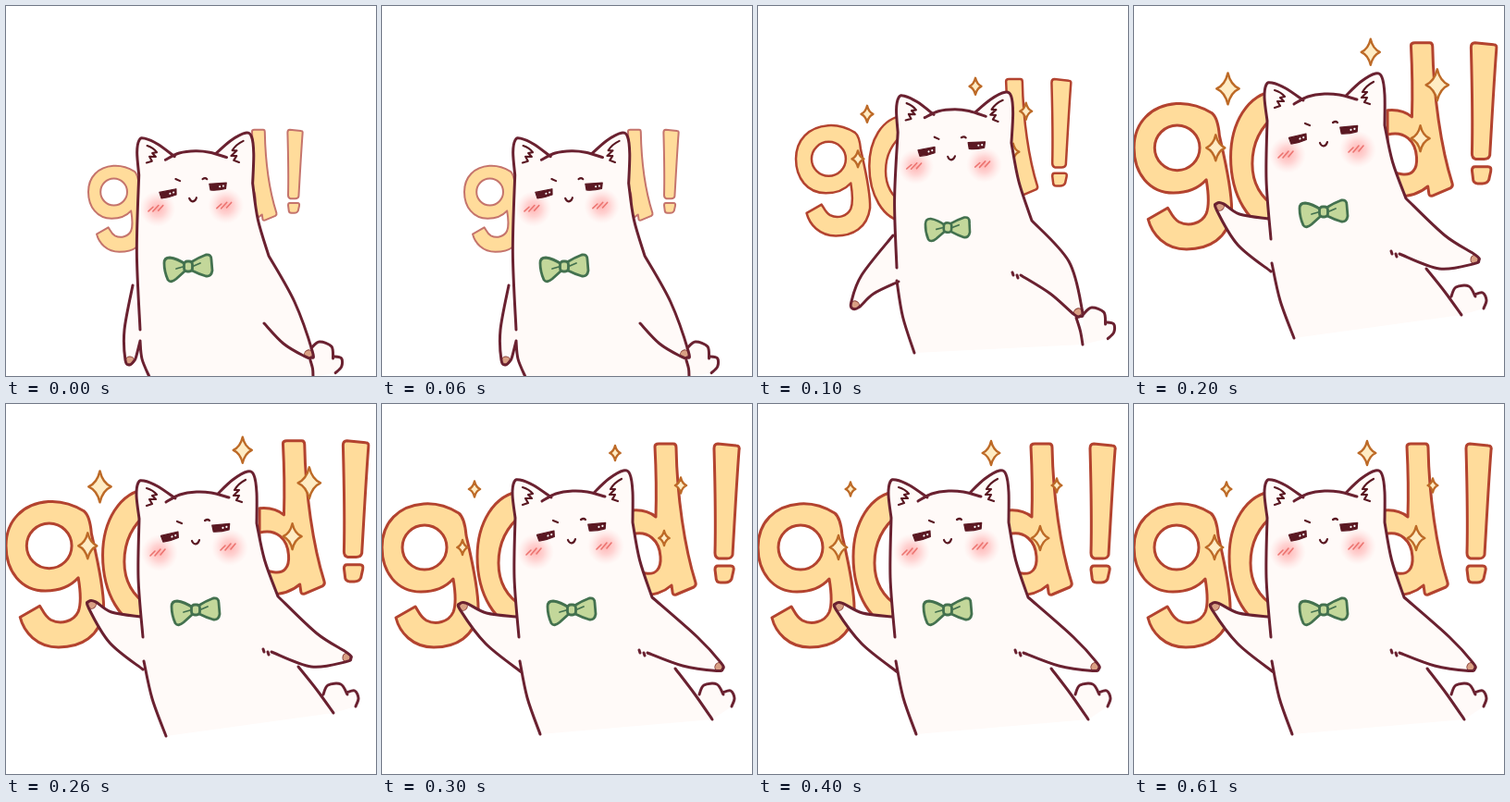
These frames come from a looping animation (400x400 px, 750 ms). An HTML page:

```html
<!DOCTYPE html>
<html lang="en">
<head>
<meta charset="utf-8">
<title>Proud white cat</title>
<style>
html, body { margin: 0; width: 100%; height: 100%; overflow: hidden; background: #fff; }
svg { display: block; width: 100vw; height: 100vh; }
</style>
</head>
<body>
<svg viewBox="0 0 400 400" stroke-linecap="round" stroke-linejoin="round">
  <defs>
    <radialGradient id="blush">
      <stop offset="0" stop-color="#ff9c9c" stop-opacity=".75"/>
      <stop offset=".45" stop-color="#ffb4b4" stop-opacity=".55"/>
      <stop offset="1" stop-color="#ffd4d4" stop-opacity="0"/>
    </radialGradient>
    <g id="word">
      <path fill-rule="evenodd" d="M83 118C70 110 58 107 45 108C18 110 0 128 0 155C0 182 16 203 42 203C58 203 69 198 77 189C79 201 81 215 77 225C72 236 58 239 48 234C41 230 39 223 36 219L15 231C19 247 33 263 56 263C80 263 100 252 104 224C105 200 95 160 91 142C90 130 88 122 83 118ZM22 155a24 24 0 1 0 48 0a24 24 0 1 0-48 0Z"/>
      <path d="M152 94C120 97 103 130 103 165C103 205 122 240 152 243V219C136 209 126 195 126 172C126 150 134 133 152 119Z"/>
      <path fill-rule="evenodd" d="M295 46Q295 43 299 43H315Q318 43 318 47C319 100 327 155 339 193Q340 196 337 198L318 206Q314 207 314 203L313 196C303 205 292 207 280 207H270V115C280 114 290 117 296 122C297 90 296 65 295 46ZM270 141C288 136 300 148 301 165C302 178 296 185 285 183L270 180Z"/>
      <path d="M363 43L383 45Q387 45 386 50C383 90 381 130 379 163Q378 167 373 167H364Q360 166 360 161C361 120 360 85 359 48Q359 43 363 43Z"/>
      <path d="M363 175H377Q381 175 380 180L378 189Q376 193 371 193H366Q361 193 361 187L360 179Q360 175 363 175Z"/>
    </g>
    <g id="eye">
      <path fill="#5a1822" stroke-width="1.2" d="M-9-3.5L10-4L9 2.5Q0 4.5-8 3.5Z"/>
      <path stroke="#fff" stroke-width="2.2" d="M2.5 0h0M6.5-.6h0"/>
    </g>
    <g id="cheek">
      <circle r="20" fill="url(#blush)" stroke="none"/>
      <path id="marks" d="M-10 3l5-5M-5 3l6-7M1 2l5-6" stroke="#ec7470" stroke-width="1.6"/>
    </g>
    <g id="face" fill="none" stroke="#5a1822" stroke-width="2.2">
      <use href="#cheek" x="-39" y="12"/><use href="#cheek" x="37" y="6"/>
      <path d="M-4-1Q-3 2 0 2.5Q3 2 4-2"/>
      <path d="M-20-22L-15-20M10-23Q13-25 15-23"/>
      <use href="#eye" transform="translate(-28 -5) rotate(-12)"/>
      <use href="#eye" transform="translate(27 -15) rotate(-4)"/>
      <path d="M-53-58Q-46-56-42-51L-47-50L-43-46L-50-46L-47-41L-53-39"/>
      <path d="M54-67Q46-63 42-56L47-56L41-50L47-50L44-45L50-43"/>
    </g>
    <g id="bow" fill="#c3d79a" stroke="#43714f" stroke-width="2.8">
      <path d="M-3-3Q-12-9-20-10Q-26-10-26-4Q-26 5-22 14Q-19 18-13 13L-3 4Z"/>
      <path d="M3-5Q11-10 19-13Q25-14 25-8L26 4Q25 11 19 10Q12 8 4 4Z"/>
      <path d="M-13 2L-6 0M6-1L13-4" fill="none" stroke-width="1.8"/>
      <rect x="-4.5" y="-6" width="9" height="11" rx="3.5"/>
    </g>
    <path id="star" d="M0-1Q.24-.24 1 0Q.24.24 0 1Q-.24.24-1 0Q-.24-.24 0-1Z" vector-effect="non-scaling-stroke"/>
  </defs>
  <g id="scene"></g>
</svg>
<script>
const scene = document.getElementById('scene');
const LINE = '#6a2130', SKIN = '#fffaf8';

// Shared shapes: the head around the mouth, the tail around its root
const points = text => text.split(' ').map(s => s.split(',').map(Number));
const HEAD = [
  '-61,-25 -64,-50 -62,-64 -56,-66 -41,-60 -22,-47',
  '-32,-43 -17,-51 1,-54 17,-53 36,-48',
  '24,-52 40,-67 56,-76 63,-72 66,-53 66,-20'
].map(points);
const TAIL = ['0,0 5,-10 19,-11 26,0', '25,-2 34,-4 38,4 35,13'].map(points);

// Stars sit in the space of the word; the late ones swell after the others
const STARS = [[100, 92], [323, 88], [252, 53, 1], [87, 155, 1], [305, 145, 1]];

// Placements are x, y, turn, scale. Arms run clockwise and the third point is the paw.
// Hips: right top and bottom, left bottom and top.
const rise = {
  head: [202, 209, 2, 0.97], bow: [197, 282], tail: [330, 370, 25],
  right: '284,270 312,320 327,376 300,365 279,343',
  left: '145,362 141,378 134,383 128,350 137,302',
  waist: [145, 350], hips: '329,383 332,401 155,401 145,362',
  word: [89, 108, 0, 0.6], ink: '#c5746c', pen: 2, glow: [0, 0]
};
const spread = {
  head: [209, 164, 3, 0.97], bow: [205, 240, 2, 0.93], tail: [352, 333, 25],
  right: '296,232 336,276 346,331 316,311 284,291',
  left: '152,298 125,311 105,323 112,291 146,248',
  waist: [150, 283], hips: '344,337 351,366 169,375 150,297',
  word: [41, 46, 0, 0.77], ink: '#b3432f', pen: 2.5, glow: [9, 9], dash: true
};
const settle = {
  head: [205, 148], bow: [205, 223], tail: [343, 314],
  right: '292,209 341,252 364,284 325,283 287,269',
  left: '151,290 112,259 88,219 113,226 146,230',
  waist: [148, 252], hips: '317,286 357,341 171,357 149,278',
  word: [0, 0], ink: '#b3432f', pen: 3, glow: [8.5, 8], dash: true
};
const fling = {
  ...settle, head: [205, 149],
  right: '294,208 336,248 368,274 330,284 287,268',
  left: '148,287 112,258 93,217 114,225 146,230',
  hips: '316,284 354,334 173,359 149,278',
  word: [0, -4, 0, 1.015], glow: [17, 14]
};
const twinkle = { ...settle, glow: [7.5, 13] };
const poses = [rise, spread, fling, settle, twinkle];

function move(list, [x, y, turn = 0, size = 1]) {
  const a = turn * Math.PI / 180, c = Math.cos(a) * size, s = Math.sin(a) * size;
  return list.map(([u, v]) => [x + u * c - v * s, y + u * s + v * c]);
}

// Line from a to b whose middle is pushed sideways
const bend = (a, b, push) => [a, [(a[0] + b[0]) / 2 + push, (a[1] + b[1]) / 2], b];

// Arm with a rounded paw that points away from the elbow
function arm(text) {
  const [from, over, [x, y], under, to] = points(text);
  const a = Math.atan2(y - (over[1] + under[1]) / 2, x - (over[0] + under[0]) / 2);
  const tip = [-1.57, 0, 1.57].map(k => [x + 5 * Math.cos(a + k), y + 5 * Math.sin(a + k)]);
  const paw = `<ellipse rx="4" ry="4.5" fill="#d9a084" stroke="#8a4038" transform="translate(${x} ${y}) rotate(${a * 180 / Math.PI})"/>`;
  return { line: [from, over, ...tip, under, to], paw };
}

// Smooth curve through points
function curve(p, start = 'M') {
  const at = i => p[Math.max(0, Math.min(p.length - 1, i))];
  let d = start + p[0];
  for (let i = 0; i < p.length - 1; i++) {
    const [a, b, c, e] = [at(i - 1), at(i), at(i + 1), at(i + 2)];
    const out = [0, 1].map(k => b[k] + (c[k] - a[k]) / 6);
    const into = [0, 1].map(k => c[k] - (e[k] - b[k]) / 6);
    d += `C${out} ${into} ${c}`;
  }
  return d;
}
const strokes = lines => lines.map(p => curve(p)).join('');
const area = lines => lines.map((p, i) => curve(p, i ? 'L' : 'M')).join('') + 'Z';
const place = (id, [x, y, turn = 0, size = 1], look = '') =>
  `<use href="#${id}" transform="translate(${x} ${y}) rotate(${turn}) scale(${size})" ${look}/>`;

function stars(p) {
  return move(STARS, p.word).map(([x, y], i) => {
    const r = p.glow[STARS[i][2] || 0];
    return r && `<use href="#star" transform="translate(${x} ${y}) scale(${r * 0.72} ${r})"/>`;
  }).filter(Boolean).join('');
}

function cat(p) {
  const right = arm(p.right), left = arm(p.left);
  const head = HEAD.map(part => move(part, p.head));
  const tail = TAIL.map(part => move(part, p.tail));
  const [hipR, footR, footL, hipL] = points(p.hips);
  const outline = [
    bend(footL, hipL, -3), left.line,
    bend(p.waist, head[0][0], -3), ...head,
    bend(head[2].at(-1), right.line[0], -3), right.line,
    bend(hipR, footR, 1)
  ];
  const [x, y] = right.line.at(-1);
  const dash = p.dash ? `M${x - 9} ${y - 3}l1 3m4 0l1 3` : '';
  return `<path d="${area([...tail, [footR]])}" fill="${SKIN}"/>
    <path d="${area(outline)}" fill="${SKIN}"/>${left.paw}${right.paw}
    <path d="${strokes([...outline, ...tail])}${dash}" fill="none" stroke="${LINE}" stroke-width="3"/>
    ${place('face', p.head)}${place('bow', p.bow)}`;
}

const frames = poses.map(p =>
  place('word', p.word, `fill="#ffdc9b" stroke="${p.ink}" stroke-width="${p.pen / (p.word[3] || 1)}"`) +
  `<g fill="#ffecc4" stroke="#bd6a27" stroke-width="2.4">${stars(p)}</g>` + cat(p));

const LOOP = 750, STEP = 100;
const begin = performance.now();
let shown = -1;

function draw() {
  const t = (performance.now() - begin) % LOOP;
  const i = Math.min(frames.length - 1, Math.floor(t / STEP));
  if (i !== shown) scene.innerHTML = frames[shown = i];
  requestAnimationFrame(draw);
}
draw();
</script>
</body>
</html>
```
